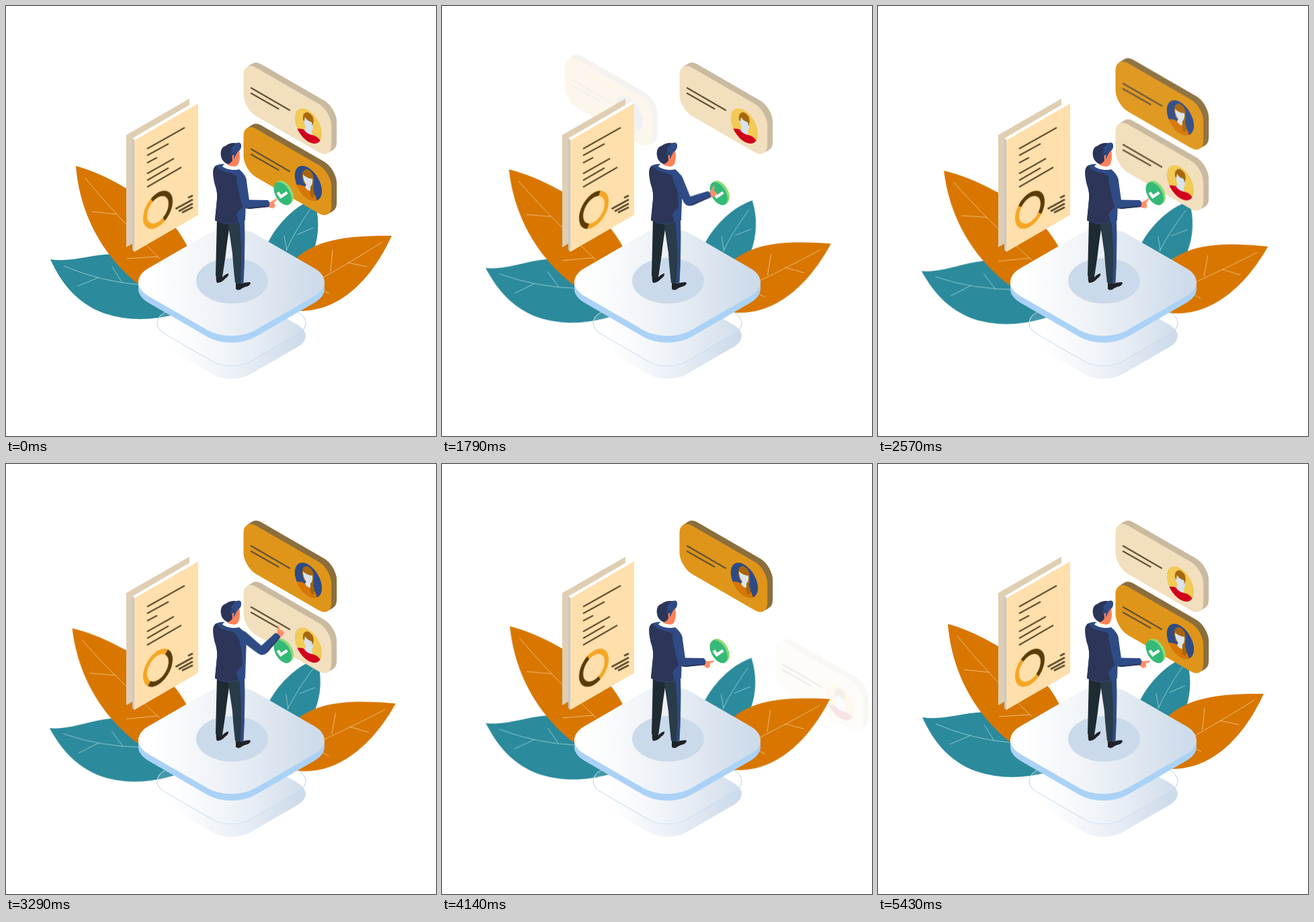
Animation of 640 by 640 pixels, one loop 5500 ms. Source, as an HTML page without scripts:

```html
<!DOCTYPE html>
<html lang="en">
<head>
<meta charset="utf-8">
<title>Choosing a candidate</title>
<style>
html, body { margin: 0; height: 100%; overflow: hidden; background: #fff; }
svg { display: block; width: 100%; height: 100%; }

.leaf { animation: sway 5.5s cubic-bezier(.37,0,.63,1) infinite; }
.vein { fill: none; stroke-width: 1; stroke-linecap: round; }
@keyframes sway { 50% { transform: rotate(var(--turn)); } }

.ring { animation: spin 2.75s linear infinite; }
@keyframes spin { to { transform: rotate(360deg); } }

.line { fill: none; stroke: #665436; stroke-width: 2.4; }

.card { animation: 5.5s infinite; }
.red { animation-name: red-move, red-fade; }
.blue { animation-name: blue-move, blue-fade; }

@keyframes red-move {
  0%, 34.55% { transform: none; animation-timing-function: cubic-bezier(.4,0,.3,1); }
  51.64% { transform: translate(0,91px); }
  62.36% { transform: translate(0,91px); animation-timing-function: cubic-bezier(.37,0,.63,1); }
  77.45%, 78.2% { transform: translate(150px,181px); }
  78.21% { transform: translate(0,-91px); }
  81.64% { transform: translate(0,-91px); animation-timing-function: cubic-bezier(.4,0,.3,1); }
  98%, 100% { transform: none; }
}
@keyframes red-fade {
  0%, 62.36% { opacity: 1; animation-timing-function: linear; }
  76.9%, 85.45% { opacity: 0; animation-timing-function: linear; }
  95.64%, 100% { opacity: 1; }
}
@keyframes blue-move {
  0%, 20.91% { transform: translate(0,91px); animation-timing-function: cubic-bezier(.38,0,.45,1); }
  34.54% { transform: translate(-176px,-14.6px); }
  34.55% { transform: translate(0,-91px); animation-timing-function: cubic-bezier(.4,0,.3,1); }
  51.64% { transform: none; }
  81.64% { transform: none; animation-timing-function: cubic-bezier(.4,0,.3,1); }
  98%, 100% { transform: translate(0,91px); }
}
@keyframes blue-fade {
  0%, 20.91% { opacity: 1; animation-timing-function: linear; }
  33.64%, 36.5% { opacity: 0; animation-timing-function: linear; }
  47.2%, 100% { opacity: 1; }
}

.arm, .fore, .hand { animation: 5.5s cubic-bezier(.37,0,.63,1) infinite; }
.arm { transform-origin: 347px 255px; animation-name: arm; }
.fore { transform-origin: 357px 295px; animation-name: fore; }
.hand { transform-origin: 390px 295px; animation-name: hand; }
@keyframes arm {
  0%, 10.9%, 43.6%, 52.7%, 70.9%, 100% { transform: rotate(0deg); }
  19.1%, 34.5% { transform: rotate(-14deg); }
  59.1%, 62.7% { transform: rotate(-41deg); }
}
@keyframes fore {
  0%, 10.9%, 43.6%, 52.7%, 70.9%, 100% { transform: rotate(0deg); }
  19.1%, 34.5% { transform: rotate(-4deg); }
  59.1%, 62.7% { transform: rotate(-2.5deg); }
}
@keyframes hand {
  0%, 10.9%, 43.6%, 52.7%, 100% { transform: rotate(-25deg); }
  19.1%, 34.5% { transform: rotate(-38deg); }
  59.1%, 62.7% { transform: rotate(-40deg); }
  70.9%, 98.8% { transform: rotate(0deg); }
}
</style>
</head>
<body>
<svg viewBox="0 0 640 640">
  <defs>
    <linearGradient id="top" x1="0" y1="1" x2="1" y2="0">
      <stop offset=".12" stop-color="#fff"/>
      <stop offset=".45" stop-color="#eef2f7"/>
      <stop offset=".9" stop-color="#cddbea"/>
    </linearGradient>
    <linearGradient id="low" x1="0" y1="1" x2="1" y2="0">
      <stop offset=".15" stop-color="#fff"/>
      <stop offset=".5" stop-color="#edf1f7"/>
      <stop offset=".9" stop-color="#cddbea"/>
    </linearGradient>
    <rect id="tile" x="-92" y="-92" width="184" height="184" rx="41"/>
    <rect id="plate" width="151" height="72" rx="21.500" transform="matrix(.866 .5 0 1 353.5 81)"/>
    <g id="body">
      <use href="#plate" x="8" y="-5"/>
      <use href="#plate" x="5.4" y="-3.4"/>
      <use href="#plate" x="2.7" y="-1.7"/>
    </g>
    <path id="note" class="line" stroke-linecap="round" d="M365 122 L422 155 M365 130 L405.500 153"/>
    <circle id="disc" r="23.500" transform="matrix(.866 .5 0 1 450 178.500)"/>
    <clipPath id="round"><use href="#disc"/></clipPath>
    <clipPath id="round-high"><use href="#disc" y="-5.500"/></clipPath>
  </defs>

  <g class="leaf" style="--turn:2.3deg;transform-origin:385px 418px">
    <path fill="#2b8a9b" d="M458 287 C425 300 400 330 388 356 L430 378 L458 364 Q471 326 458 287z"/>
    <path class="vein" stroke="#8cc8d2" d="M453 302 Q430 335 417 364 M457 330 L434 340 M414 342 L418 363"/>
  </g>

  <g class="card red">
    <use href="#body" fill="#c9baa0"/>
    <use href="#plate" fill="#f2dfbe"/>
    <use href="#note"/>
    <g clip-path="url(#round)">
      <use href="#disc" fill="#f2ca55"/>
      <path fill="#d1001c" d="M428 184 Q437 181 444 184 L456 192 Q466 194 471 206 L460 210 L438 206z"/>
      <path fill="#d9e3ec" d="M443 166 L457 172 Q458 182 455 186 L456 192 Q449 191 444 185 L446 180 Q443 174 443 166z"/>
      <path fill="#a5680f" d="M442 169 Q441 158 449 158 Q458 162 458 172 L456 179 L455 173 Q448 171 445 165 L444 172z"/>
    </g>
  </g>

  <g class="card blue">
    <use href="#body" fill="#8b6e3c"/>
    <use href="#plate" fill="#df9519"/>
    <use href="#note"/>
    <g clip-path="url(#round-high)">
      <use href="#disc" y="-5.500" fill="#2f4b86"/>
      <path fill="#d87600" d="M430 176 Q438 173 445 178 L455 185 Q461 188 463 200 L450 206 L434 198z"/>
      <path fill="#a8650c" d="M441 164 Q440 151 449 152 Q459 157 458 170 L457 181 Q461 188 457 195 Q451 192 453 183 L443 172z"/>
      <path fill="#d9e3ec" d="M442 160 Q449 166 456 166 Q457 175 453 178 L453 184 Q448 184 445 178 L447 175 Q442 169 442 160z"/>
    </g>
  </g>

  <g class="leaf" style="--turn:5.2deg;transform-origin:400px 422px">
    <path fill="#d87600" d="M574 342 C525 342 465 343 430 377 L400 422 L437 454 C505 454 550 395 574 342z"/>
    <path class="vein" stroke="#f0bb78" d="M559 352 Q515 380 465 408 M486 363 L483 395 M509 382 L537 388 M470 423 L481 428"/>
  </g>
  <g class="leaf" style="--turn:-4.5deg;transform-origin:291px 402px">
    <path fill="#2b8a9b" d="M66 377 C95 382 125 370 160 369 L200 372 L260 440 L252 459 Q195 474 145 457 C105 442 82 412 66 377z"/>
    <path class="vein" stroke="#8cc8d2" d="M86 387 Q140 410 200 415 M107 417 L138 404 M158 388 L173 412"/>
  </g>
  <g class="leaf" style="--turn:-2.3deg;transform-origin:279px 390px">
    <path fill="#d87600" d="M104 238 C108 290 130 360 197 414 L240 402 L272 362 C255 325 220 290 180 272 Q140 248 104 238z"/>
    <path class="vein" stroke="#f0bb78" d="M118 256 Q160 308 229 376 M128 306 L165 310 M180 376 L226 373"/>
  </g>

  <!-- report -->
  <path fill="#dfceb2" d="M179 192 L273 138 V305 L179 359z"/>
  <path fill="#fff" d="M188 197 L282 142 L286 145 V149 L191 204z"/>
  <path fill="#c3c8cf" d="M188 197 L191 199 V366 L188 363z"/>
  <path fill="#ffdfab" d="M191 200 L286 145 V311 L191 366z"/>
  <path class="line" d="M210 212.500 L266 181 M210 222.500 L242 205 M210 233.500 L225 225.500 M210 249.500 L250 227 M210 259.500 L242 241 M210 269.500 L261 240"/>
  <path class="line" style="stroke-width:3" d="M271 285.500 L278 282 M252.500 302 L278 288 M257 305.500 L278 294 M262 307.500 L278 299.500"/>
  <g transform="matrix(.866 -.5 0 1 226 303.300)" fill="none" stroke-width="7">
    <g class="ring">
      <circle r="21.9" stroke="#f5a623"/>
      <path stroke="#593c0c" d="M0 -21.900 A21.900 21.900 0 0 1 0 21.900" transform="rotate(-28)"/>
    </g>
  </g>

  <!-- platform -->
  <use href="#tile" transform="matrix(.691 .399 -.691 .399 335.500 491)" fill="url(#low)"/>
  <use href="#tile" transform="matrix(.691 .399 -.691 .399 335.500 472)" fill="#fff" fill-opacity=".12" stroke="#c3dbf1" stroke-width="1.300"/>
  <g fill="#abd2f6">
    <use href="#tile" transform="matrix(.866 .5 -.866 .5 335.500 421)"/>
    <use href="#tile" transform="matrix(.866 .5 -.866 .5 335.500 417)"/>
    <use href="#tile" transform="matrix(.866 .5 -.866 .5 335.500 414)"/>
  </g>
  <use href="#tile" transform="matrix(.866 .5 -.866 .5 335.500 411)" fill="url(#top)"/>
  <ellipse cx="336.500" cy="409" rx="53.500" ry="34" fill="#cbdaea"/>

  <!-- button -->
  <g transform="matrix(.866 .5 0 1 411.800 279.300)">
    <circle cx="3.400" cy="-4" r="15.300" fill="#8edb75"/>
    <circle cx="1.700" cy="-2" r="15.300" fill="#8edb75"/>
    <circle r="15.300" fill="#35b978"/>
  </g>
  <path fill="none" stroke="#fff" stroke-width="4.500" d="M404.500 277.500 L409 284 L418.500 277.500"/>

  <!-- man -->
  <path fill="#1e2229" d="M313 401 L322 404 Q326 399 331 398 Q332 402 326 406 Q321 412 314 412 Q312 408 313 401z M342 412 L350 413 Q357 411 363 411 Q366 413 360 417 Q352 419 349 422 Q344 424 342 421z"/>
  <path fill="#1f2b33" d="M314 314 L334 320 Q329 350 327 370 Q324 390 322 404 Q317 405 312 402 Q313 360 314 314z"/>
  <path fill="#2a3b49" d="M330 320 L355 317 Q356 370 353 412 Q347 414 341 412 Q338 385 337 368z"/>
  <path fill="#2f4b86" d="M347 318 L355 317 Q356 370 353.500 412 L349 413 Q352 360 347 318z"/>
  <path fill="#2f4b86" d="M324 235 Q312 235 309 242 Q307 250 311 266 Q315 276 314 288 L311 319 Q322 325 333 324.500 Q347 323 356 319 L357 290 L358 260 Q356 250 347 243 Q336 246 324 235z"/>
  <path fill="#2d3658" d="M313 237 Q318 245 330 248 Q342 250 346 256 L351 280 L352 300 Q346 304 343 311 L346 321.500 Q328 327 311 319 L314 288 Q315 276 311 266 Q307 250 309 242 Q310 239 313 237z"/>
  <path fill="#fff" d="M324 236 Q335 240 346 236 L348 242 Q335 247 322 239z"/>
  <path fill="#ff8058" d="M338 216 L347 214 Q349 224 347 231 Q346 238 340 239 Q334 239 329 236 L333 228z"/>
  <path fill="#2b3558" d="M320 223 Q318 211 327 208 Q334 203 342 204 Q350 202 350 208 Q350 213 346 216 Q343 218 342 223 Q339 219 336.500 223 L337 230 Q333 236 329 235 Q321 231 320 223z"/>
  <path fill="#2f4b86" d="M335 213 Q339 205 344 204 Q350 202 350 208 Q350 213 346 216 Q342 219 340 228 Q338 224 340 216 Q336 222 332 222 Q338 217 335 213z"/>

  <g class="arm">
    <path fill="#2f4b86" d="M344 249 Q354 246 357.500 257 L362 289 Q364 300 357 301 Q352 300 350 292 L343 260z"/>
    <g class="fore">
      <g class="hand">
        <path fill="#ff8e6b" d="M388 291 L395 293.500 L405 292.500 Q407 294 399 297 L399 301 Q397 305 393 303 L388 299z"/>
      </g>
      <path fill="#2f4b86" d="M351 293 Q354 288 361 288.500 L390 289 Q394 294 391 299 L362 302 Q352 302 351 293z"/>
      <path fill="#2d3658" d="M357 300.500 Q375 298.500 391 297.500 L391 299 L362 302z"/>
    </g>
  </g>
</svg>
</body>
</html>
```
